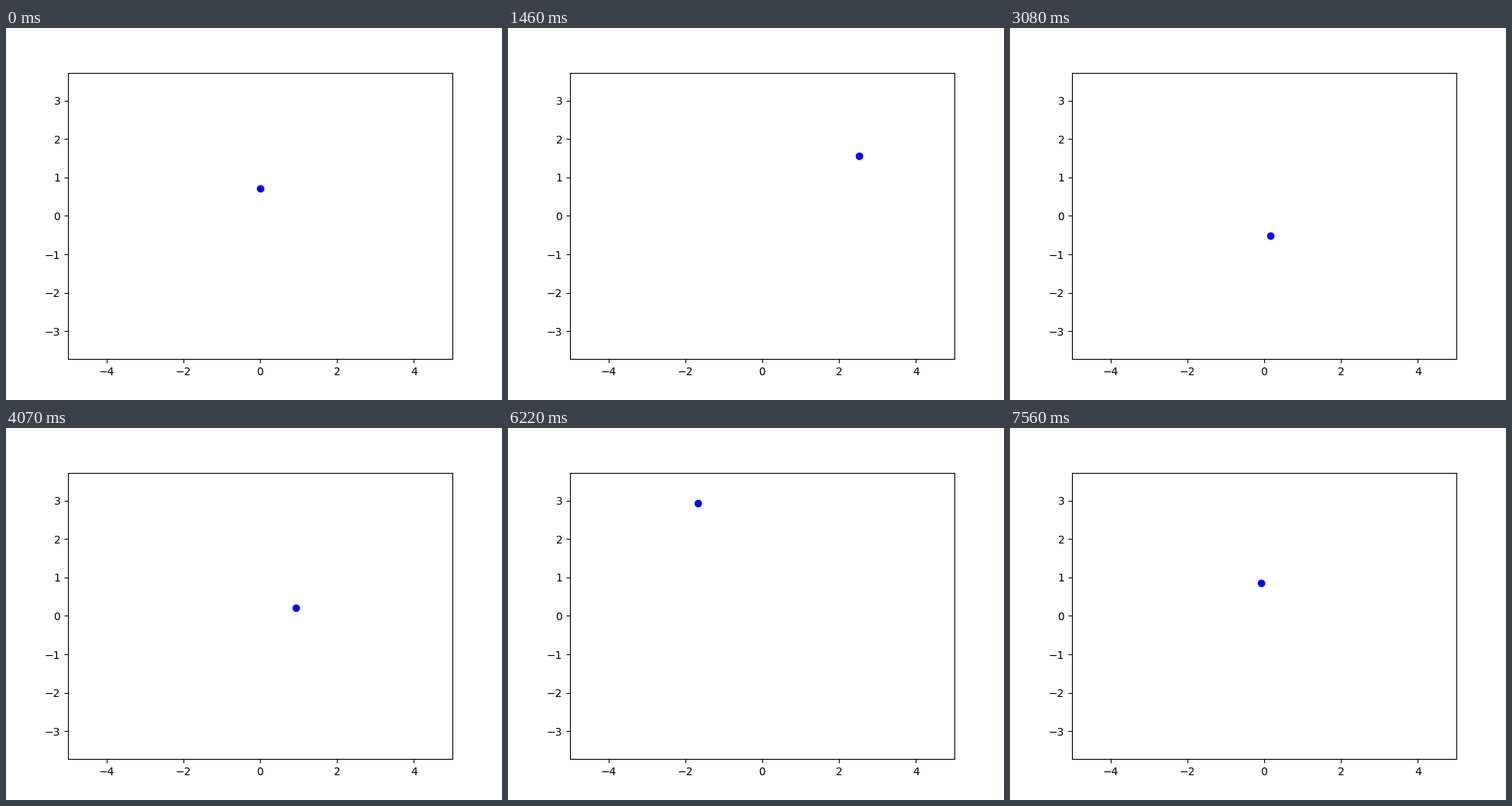
Write a matplotlib script that moves like this. It is 640 by 480 pixels and loops after 7580 ms.

```python
import numpy as np
import matplotlib.pyplot as plt
from matplotlib.animation import FuncAnimation

FRAMES = 379
STEP = 0.1
PAUSES = (184, 204)  # frames on which the curve parameter waits

fig, ax = plt.subplots(figsize=(6.4, 4.8), dpi=100)
half_height = 5 * 369.6 / 496  # equal scale on both axes
ax.set_xlim(-5, 5)
ax.set_ylim(-half_height, half_height)
ax.set_xticks(range(-4, 5, 2))
ax.set_yticks(range(-3, 4))
dot, = ax.plot([], [], "bo")


def butterfly(t):
    r = np.exp(np.cos(t)) - 2 * np.cos(4 * t) + np.sin(t / 12) ** 5
    return r * np.sin(t), r * np.cos(t)


def update(i):
    t = STEP * (i - sum(i >= p for p in PAUSES))
    x, y = butterfly(t)
    dot.set_data([x], [y])
    return dot,


anim = FuncAnimation(fig, update, frames=FRAMES, interval=20,
                     repeat=True, repeat_delay=0, blit=False)
plt.show()
```
